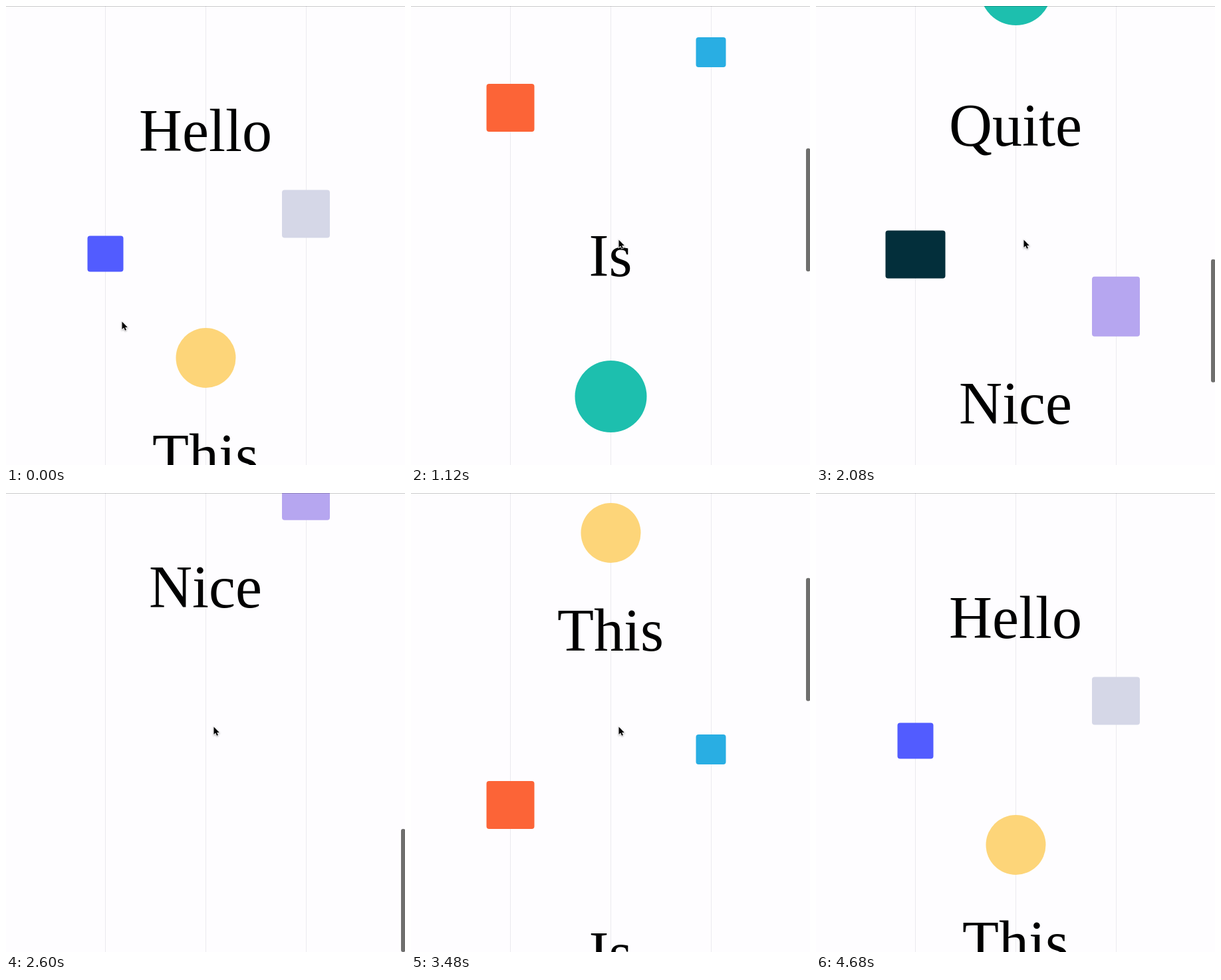
Recreate the animation shown at these times as an HTML page. Size 600x690 px, loop 5.6 s.

```html
<!DOCTYPE html>
<html lang="en">
<head>
<meta charset="utf-8">
<title>Scroll</title>
<style>
  html, body { margin: 0; height: 100%; overflow: hidden; background: #fefdff; }
  svg { display: block; }
  text { font: 90px "Liberation Serif", "Times New Roman", serif; text-anchor: middle; }
  #pointer { filter: drop-shadow(0 1px 1px #0005); }
</style>
</head>
<body>
<svg width="600" height="690" viewBox="0 0 600 690">
  <rect width="600" height="690" fill="#fefdff"/>
  <path d="M149.5 0V690M300.5 0V690M451.5 0V690" stroke="#ebeaef"/>
  <g id="page">
    <text x="300" y="218">Hello</text>
    <rect x="415" y="276.5" width="72" height="72" rx="4" fill="#d5d7e7"/>
    <rect x="122.5" y="345.5" width="54" height="54" rx="4" fill="#525cff"/>
    <circle cx="300.5" cy="529" r="45" fill="#fdd579"/>
    <text x="300" y="705.5">This</text>
    <rect x="428.5" y="832" width="45" height="45" rx="4" fill="#29aee3"/>
    <rect x="113.5" y="902" width="72" height="72" rx="4" fill="#fc6437"/>
    <text x="300" y="1190.5">Is</text>
    <circle cx="300.5" cy="1372" r="54" fill="#1dbfae"/>
    <text x="300" y="1607">Quite</text>
    <rect x="104.5" y="1734.5" width="90" height="72" rx="4" fill="#032f3b"/>
    <rect x="415" y="1803.7" width="72" height="90" rx="4" fill="#b6a6f0"/>
    <text x="300" y="2024.7">Nice</text>
  </g>
  <rect width="600" height="1" fill="#0003"/>
  <rect id="thumb" x="594" width="6.5" height="185" rx="3" fill="#6f6f6e"/>
  <path id="pointer" d="M0 0V11.6L2.7 9.1 4.5 13.2 6.4 12.4 4.7 8.4H8.3Z"
        stroke="#fff" stroke-width="1.4" paint-order="stroke"/>
</svg>
<script>
const LOOP = 5600, STEP = 40, MAX_SCROLL = 1853;
const page = document.getElementById("page");
const thumb = document.getElementById("thumb");
const pointer = document.getElementById("pointer");

// [ms, scroll offset]: flicks down to the end, then back up
const scrollKeys = [
  [0, 0], [720, 0], [940, 480], [1120, 785], [1320, 920], [1480, 968], [1580, 1010],
  [1800, 1250], [2080, 1397], [2320, 1700], [2500, 1845], [2600, MAX_SCROLL],
  [2680, MAX_SCROLL], [2900, 1500], [3160, 960], [3480, 469], [3740, 255], [3920, 0], [LOOP, 0]
];

const clamp = v => Math.max(0, Math.min(1, v));

const slope = i => {
  const a = scrollKeys[i], b = scrollKeys[i + 1];
  return a && b ? (b[1] - a[1]) / (b[0] - a[0]) : 0;
};

// Harmonic mean keeps the curve monotone between keys
const tangent = i => {
  const a = slope(i - 1), b = slope(i);
  return a * b > 0 ? 2 * a * b / (a + b) : 0;
};

function scrollAt(t) {
  const i = scrollKeys.findIndex(k => k[0] > t) - 1;
  const [t0, y0] = scrollKeys[i], [t1, y1] = scrollKeys[i + 1];
  const d = t1 - t0, u = (t - t0) / d, v = 1 - u;
  return v * v * ((1 + 2 * u) * y0 + u * d * tangent(i))
       + u * u * ((3 - 2 * u) * y1 - v * d * tangent(i + 1));
}

function pointerAt(t) {
  const enter = clamp((t - 120) / 80), leave = clamp((t - 4440) / 240);
  return [174.5 + 138 * enter - 19 * leave,
          474.5 - 123 * enter - 375 * leave * leave];
}

function draw(t) {
  const y = scrollAt(t);
  page.setAttribute("transform", `translate(0 ${-y})`);
  thumb.setAttribute("y", y / MAX_SCROLL * 505);
  thumb.setAttribute("opacity", t < 760 ? 0 : 1 - clamp((t - 4440) / 240));
  pointer.setAttribute("transform", `translate(${pointerAt(t)})`);
}

const start = performance.now();
function tick() {
  const t = (performance.now() - start) % LOOP;
  draw(Math.floor(t / STEP) * STEP);
  requestAnimationFrame(tick);
}
tick();
</script>
</body>
</html>
```
